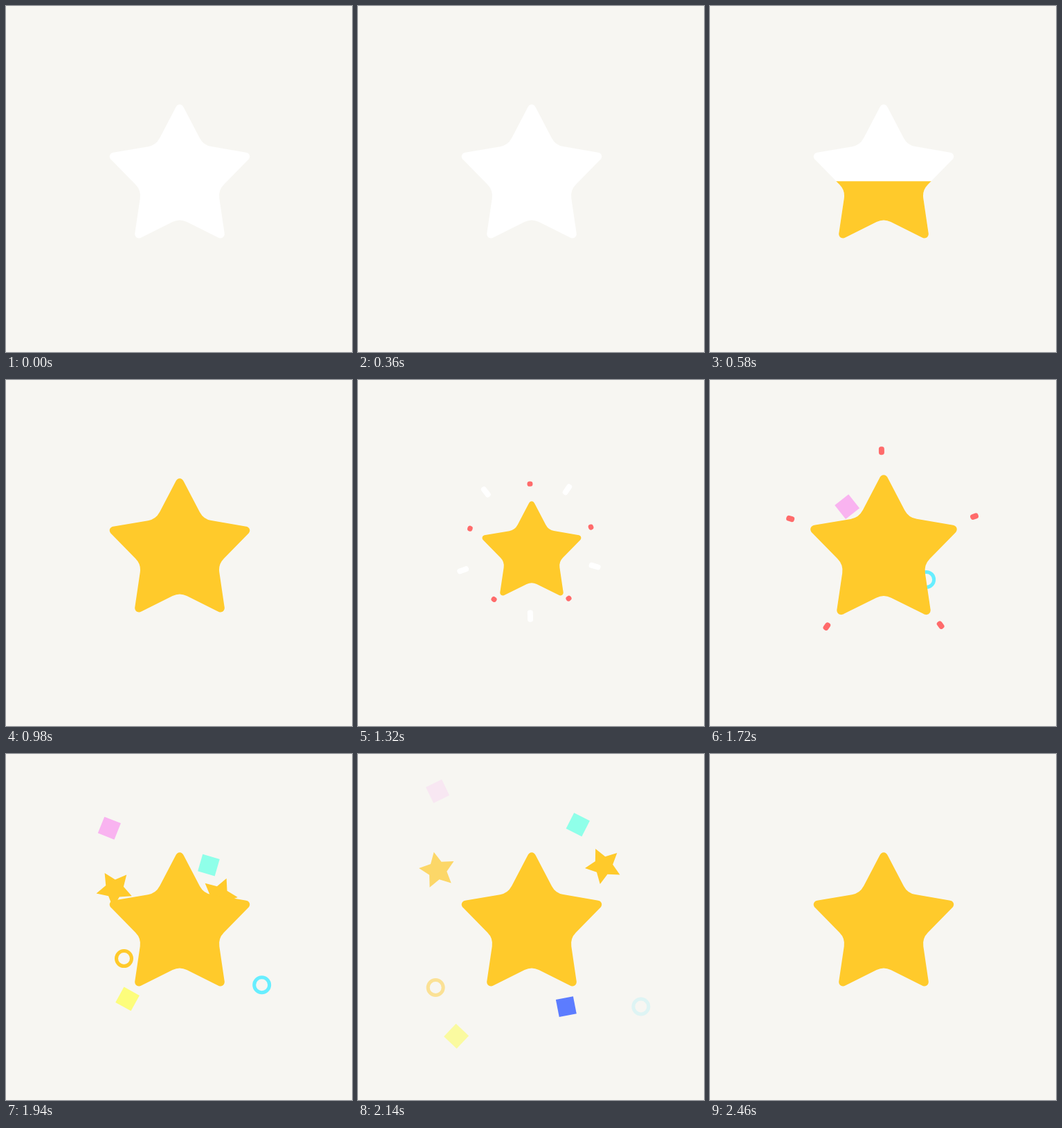
Animation of 500 by 500 pixels, one loop 3.02 s. Source, as an HTML page:

```html
<!DOCTYPE html>
<html lang="en">
<head>
<meta charset="utf-8">
<title>Star burst</title>
<style>
  html, body { margin: 0; width: 100%; height: 100%; overflow: hidden; background: #f7f6f2; }
  svg { display: block; width: 100%; height: 100%; }
</style>
</head>
<body>
<svg id="stage" viewBox="0 0 500 500">
  <defs>
    <path id="starShape"/>
    <clipPath id="level"><rect id="levelRect" width="500" height="500"/></clipPath>
  </defs>
  <g id="sparks"></g>
  <g id="confetti"></g>
  <g id="star">
    <use id="empty" href="#starShape" fill="#fff"/>
    <use href="#starShape" fill="#ffca2b" clip-path="url(#level)"/>
  </g>
</svg>
<script>
const LOOP = 3020, STEP = 20, LAST_CHANGE = 2460;
const YELLOW = '#ffca2b';
const $ = id => document.getElementById(id);

const clamp = v => Math.min(1, Math.max(0, v));
const mix = (a, b, p) => a + (b - a) * p;
const span = (t, from, to) => clamp((t - from) / (to - from));
const inOut = u => (1 - Math.cos(Math.PI * u)) / 2;

// cubic-bezier(.42, 0, 1, 1)
function easeIn(x) {
  let lo = 0, hi = 1;
  for (let i = 0; i < 24; i++) {
    const s = (lo + hi) / 2, r = 1 - s;
    if (1.26 * r * r * s + 3 * r * s * s + s ** 3 < x) lo = s; else hi = s;
  }
  return 3 * (1 - lo) * lo * lo + lo ** 3;
}

function add(parent, tag, attrs) {
  const el = document.createElementNS('http://www.w3.org/2000/svg', tag);
  for (const key in attrs) el.setAttribute(key, attrs[key]);
  return parent.appendChild(el);
}

// One rounded arm, turned five times around the centre.
function roundedStar(cx, cy) {
  const arm = i => {
    const a = i * Math.PI * 2 / 5, c = Math.cos(a), s = Math.sin(a);
    const at = (x, y) => `${cx + x * c - y * s} ${cy + x * s + y * c} `;
    return (i ? '' : 'M' + at(-29, -57.5)) +
      'L' + at(-6, -101.5) + 'C' + at(-3.5, -107.8) + at(3.5, -107.8) + at(6, -101.5) +
      'L' + at(29, -57.5) + 'Q' + at(34.4, -47.3) + at(45.7, -45.4);
  };
  return Array.from({ length: 5 }, (_, i) => arm(i)).join('') + 'Z';
}
$('starShape').setAttribute('d', roundedStar(251, 248.5));

// Dashes that grow outwards, then are eaten up from the inside.
const bursts = [
  { color: '#fff', cx: 246, cy: 241, angle: 16.3, near: 72, far: 115, head: 1110, tail: 1188, time: 280 },
  { color: '#ff6b6b', cx: 249.6, cy: 242, angle: -18.7, near: 88, far: 148, head: 1177, tail: 1300, time: 620 }
];
for (const b of bursts) {
  b.dashes = Array.from({ length: 5 }, (_, i) => add($('sparks'), 'rect', {
    y: -4, height: 8, rx: 3.5, fill: b.color,
    transform: `translate(${b.cx} ${b.cy}) rotate(${b.angle + 72 * i})`
  }));
}

const shapes = {
  square: color => ['rect', { x: -12.75, y: -12.75, width: 25.5, height: 25.5, fill: color }],
  ring: color => ['circle', { r: 11, fill: 'none', stroke: color, 'stroke-width': 5 }],
  star: color => ['polygon', {
    fill: color,
    points: Array.from({ length: 10 }, (_, i) => {
      const r = i % 2 ? 13.5 : 27, a = Math.PI * i / 5;
      return `${r * Math.sin(a)},${-r * Math.cos(a)}`;
    }).join(' ')
  }]
};

const FLIGHT_START = 1370, FLIGHT_TIME = 930, FADE = 0.14;

// Pieces wait behind the star, then fly to (x, y); "gone" is the share of the flight after which they are invisible.
function launch(kind, color, delay, x, y, { spin = 0, gone = 0.86 } = {}) {
  const el = add($('confetti'), ...shapes[kind](color));
  const startX = mix(250, x, 0.07), startY = 248;
  return t => {
    const u = clamp((t - FLIGHT_START - delay) / FLIGHT_TIME), p = inOut(u);
    el.setAttribute('transform',
      `translate(${mix(startX, x, p)} ${mix(startY, y, p)}) rotate(${spin * p})`);
    el.setAttribute('opacity', t < 1240 ? 0 : clamp((gone - u) / FADE));
  };
}

const confetti = [
  launch('star', YELLOW, 60, 96, 156, { spin: 70 }),
  launch('star', YELLOW, 205, 402, 118, { spin: 70, gone: 0.95 }),
  launch('ring', YELLOW, 180, 60, 375, { gone: 0.7 }),
  launch('ring', '#67eeff', -8, 419, 373),
  launch('square', '#fdfd7c', 60, 127, 432, { spin: 50 }),
  launch('square', '#8fffe9', 120, 334, 64, { spin: 34 }),
  launch('square', '#5c7cff', 290, 341, 471, { spin: -21 }),
  launch('square', '#f9b3f0', 0, 105.5, 39, { spin: 166 })
];

function starScale(t) {
  if (t < 1280) return mix(1, 0.66, inOut(span(t, 980, 1280)));
  if (t < 1500) return mix(0.66, 1.23, inOut(span(t, 1280, 1500)));
  return mix(1.23, 1, inOut(span(t, 1500, 1810)));
}

function draw(t) {
  const filled = t >= 740;
  $('levelRect').setAttribute('y', filled ? 0 : mix(339, 142, easeIn(span(t, 335, 740))));
  $('empty').style.display = filled ? 'none' : '';
  $('star').setAttribute('transform', `translate(251 254) scale(${starScale(t)}) translate(-251 -254)`);

  for (const b of bursts) {
    const reach = from => mix(b.near, b.far, inOut(span(t, from, from + b.time)));
    const inner = reach(b.tail), length = reach(b.head) - inner;
    for (const dash of b.dashes) {
      dash.setAttribute('x', inner);
      dash.setAttribute('width', Math.max(0, length));
    }
  }

  for (const fly of confetti) fly(t);
}

const began = performance.now();
function tick() {
  const t = (performance.now() - began) % LOOP;
  draw(Math.min(LAST_CHANGE, Math.floor(t / STEP) * STEP));
  requestAnimationFrame(tick);
}
tick();
</script>
</body>
</html>
```
